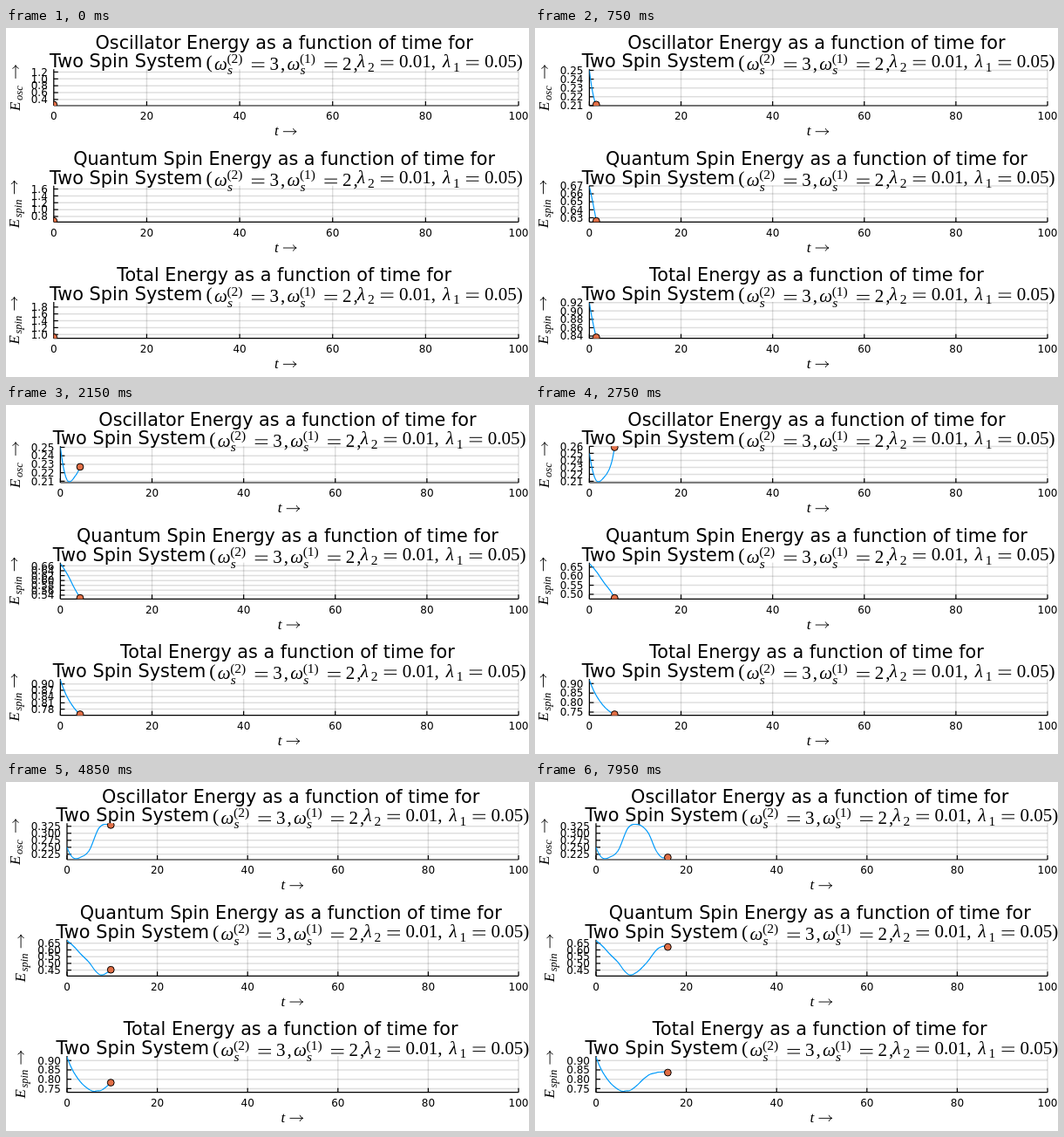
Write an HTML page with a canvas that moves like this. It is 600 px wide and 400 px high and loops after 8 s.

```html
<!DOCTYPE html>
<html lang="en">
<head>
<meta charset="utf-8">
<title>Spin system energies</title>
<style>
  html, body { margin: 0; width: 100%; height: 100%; overflow: hidden; background: #fff; }
  canvas { display: block; width: 600px; height: 400px; }
</style>
</head>
<body>
<canvas id="stage" width="600" height="400"></canvas>
<script>
const ctx = document.getElementById('stage').getContext('2d');
const SANS = '"DejaVu Sans", sans-serif';
const SERIF = '"Liberation Serif", serif';
const STEP_MS = 50, STEPS = 160, DT = 0.1;
const RIGHT = 588, TOP = 47.3, BOTTOM = 89, PITCH = 400 / 3;

// Smooth cubic through a few [time, value] knots, flat at every turning point
function curve(knots) {
  const n = knots.length;
  const gap = i => knots[i + 1][0] - knots[i][0];
  const slope = i => (knots[i + 1][1] - knots[i][1]) / gap(i);
  const tangent = i => {
    if (i === 0) return 2 * slope(0) - tangent(1);
    if (i === n - 1) return 2 * slope(n - 2) - tangent(n - 2);
    const a = slope(i - 1), b = slope(i);
    return a * b > 0 ? (a * gap(i) + b * gap(i - 1)) / (gap(i) + gap(i - 1)) : 0;
  };
  return t => {
    let i = 0;
    while (i < n - 2 && t > knots[i + 1][0]) i++;
    const h = gap(i), u = (t - knots[i][0]) / h, v = 1 - u;
    return v * v * (1 + 2 * u) * knots[i][1] + u * u * (3 - 2 * u) * knots[i + 1][1]
      + h * u * v * (v * tangent(i) - u * tangent(i + 1));
  };
}

const sample = f => Array.from({ length: STEPS }, (_, i) => f(i * DT));
const osc = sample(curve([[0, .25], [1.5, .2111], [2, .2095], [3, .2143], [4.8, .236], [7.2, .321],
  [8.4, .332], [10, .327], [11.5, .303], [13.5, .233], [14.9, .2123], [16, .2142]]));
const spin = sample(curve([[0, .669], [1.5, .626], [3, .571], [5, .503], [6.3, .444], [7.6, .414],
  [9, .434], [11, .497], [14, .616], [15.1, .628], [16, .62]]));
const PANELS = [
  { title: 'Oscillator Energy', sub: 'osc', length: 52, labelX: 11, data: osc },
  { title: 'Quantum Spin Energy', sub: 'spin', length: 54, labelX: 9.5, data: spin },
  { title: 'Total Energy', sub: 'spin', length: 54, labelX: 9.5, data: osc.map((e, i) => e + spin[i]) }
];

// Tick mantissas with their niceness
const NICE = [[1, 1], [5, .9], [2, .7], [2.5, .5], [3, .2]];

function chooseTicks(lo, hi) {
  let best = { score: -1 };
  for (let z = -5; z <= 0; z++) {
    for (const [q, nice] of NICE) {
      const size = q * 10 ** z;
      const first = Math.ceil(lo / size - 1e-9), last = Math.floor(hi / size + 1e-9);
      const count = last - first + 1;
      if (count < 4 || count > 10) continue;
      const score = .25 * (1 - Math.abs(count - 5) / 5) + .5 * (hi - lo) / ((count - 1) * size) + .25 * nice;
      if (score >= best.score - 1e-9) best = { score, size, first, count, digits: -z + (q === 2.5 ? 1 : 0) };
    }
  }
  return Array.from({ length: best.count }, (_, i) => {
    const value = (best.first + i) * best.size;
    return { value, label: value.toFixed(best.digits) };
  });
}

function axisFor(data, step) {
  const seen = data.slice(0, step + 1);
  const min = Math.min(...seen);
  const max = step ? Math.max(...seen) : min + 1;
  const pad = .03 * (max - min);
  const lo = min - pad, hi = max + pad;
  const ticks = chooseTicks(lo, hi);
  return { lo, hi, ticks, chars: ticks[0].label.length };
}

function text(str, x, y, size, family = SERIF, align = 'left', style = '') {
  ctx.font = `${style} ${size}px ${family}`;
  ctx.textAlign = align;
  ctx.fillText(str, x, y);
}
const italic = (str, x, y, size) => text(str, x, y, size, SERIF, 'left', 'italic');

function line(x1, y1, x2, y2) {
  ctx.beginPath();
  ctx.moveTo(x1, y1);
  ctx.lineTo(x2, y2);
  ctx.stroke();
}

function arrow(x, y) {
  ctx.lineWidth = .9;
  line(x, y, x + 15, y);
  ctx.beginPath();
  ctx.moveTo(x + 11.5, y - 3.6);
  ctx.quadraticCurveTo(x + 12.5, y - .8, x + 15.3, y);
  ctx.quadraticCurveTo(x + 12.5, y + .8, x + 11.5, y + 3.6);
  ctx.stroke();
}

function equals(x, y) {
  ctx.fillRect(x, y - 8.2, 14.5, 1);
  ctx.fillRect(x, y - 3.6, 14.5, 1);
}

function omega(x, index, value) {
  const y = 47.5;
  italic('ω', x, y, 21);
  text(`(${index})`, x + 14.5, 40, 15.5);
  italic('s', x + 15, 53.2, 15.5);
  equals(x + 43, y);
  text(value, x + 63.5, y, 21);
  text(',', x + 76, y, 21);
}

function lambda(x, index, value, end) {
  const y = 45;
  italic('λ', x, y, 21);
  text(index, x + 12, y + 4.5, 15.5);
  equals(x + 27, y);
  text(value + end, x + 48, y, 21);
}

function drawTitle(title, cx) {
  text(`${title} as a function of time for`, cx - 2.3, 23.7, 20.75, SANS, 'center');
  ctx.save();
  ctx.translate(cx - 321.5, 0);
  text('Two Spin System', 50, 45.3, 20.85, SANS);
  text('(', 229.5, 45.5, 22);
  omega(239, 2, '3');
  omega(322.5, 1, '2');
  lambda(403, 2, '0.01', ',');
  lambda(501, 1, '0.05', ')');
  ctx.restore();
}

function drawYLabel({ sub, length }, x) {
  ctx.save();
  ctx.translate(x, (TOP + BOTTOM) / 2 + .8 + length / 2);
  ctx.rotate(-Math.PI / 2);
  italic('E', 0, 5, 17);
  italic(sub, 12, 8.3, 12.5);
  arrow(length - 15, 0);
  ctx.restore();
}

function drawPanel(panel, axis, step, left, widest) {
  const toX = t => left + t * (RIGHT - left) / 100;
  const toY = v => BOTTOM - (v - axis.lo) / (axis.hi - axis.lo) * (BOTTOM - TOP);
  const cx = (left + RIGHT) / 2;

  ctx.strokeStyle = 'rgba(0,0,0,.13)';
  ctx.lineWidth = 1.5;
  for (let t = 0; t <= 100; t += 20) line(toX(t), TOP, toX(t), BOTTOM);
  for (const { value } of axis.ticks) line(left, toY(value), RIGHT, toY(value));

  ctx.strokeStyle = ctx.fillStyle = '#000';
  ctx.lineWidth = 1.2;
  line(left, BOTTOM, RIGHT, BOTTOM);
  line(left, TOP, left, BOTTOM);
  for (let t = 0; t <= 100; t += 20) {
    line(toX(t), BOTTOM, toX(t), BOTTOM - 5);
    text(t, toX(t), 105.3, 12, SANS, 'center');
  }
  for (const { value, label } of axis.ticks) {
    line(left, toY(value), left + 5, toY(value));
    text(label, left - 7, toY(value) + 4.3, 12, SANS, 'right');
  }

  drawTitle(panel.title, cx);
  italic('t', cx - 13.5, 123.3, 17);
  arrow(cx - 3.5, 118.7);
  drawYLabel(panel, panel.labelX + 7.6 * (widest - axis.chars));

  ctx.save();
  ctx.beginPath();
  ctx.rect(left, TOP, RIGHT - left, BOTTOM - TOP);
  ctx.clip();
  ctx.strokeStyle = '#009afa';
  ctx.lineWidth = 1.2;
  ctx.beginPath();
  for (let i = 0; i <= step; i++) ctx.lineTo(toX(i * DT), toY(panel.data[i]));
  ctx.stroke();
  ctx.beginPath();
  ctx.arc(toX(step * DT), toY(panel.data[step]), 3.9, 0, 2 * Math.PI);
  ctx.fillStyle = '#e26f46';
  ctx.fill();
  ctx.strokeStyle = '#000';
  ctx.lineWidth = 1;
  ctx.stroke();
  ctx.restore();
}

function draw(step) {
  ctx.fillStyle = '#fff';
  ctx.fillRect(0, 0, 600, 400);
  const axes = PANELS.map(p => axisFor(p.data, step));
  const widest = Math.max(...axes.map(a => a.chars));
  const left = 54.8 + 7.6 * (widest - 3);
  PANELS.forEach((panel, i) => {
    ctx.save();
    ctx.translate(0, i * PITCH);
    drawPanel(panel, axes[i], step, left, widest);
    ctx.restore();
  });
}

const start = performance.now();
function tick() {
  draw(Math.floor((performance.now() - start) / STEP_MS) % STEPS);
  requestAnimationFrame(tick);
}
tick();
</script>
</body>
</html>
```
